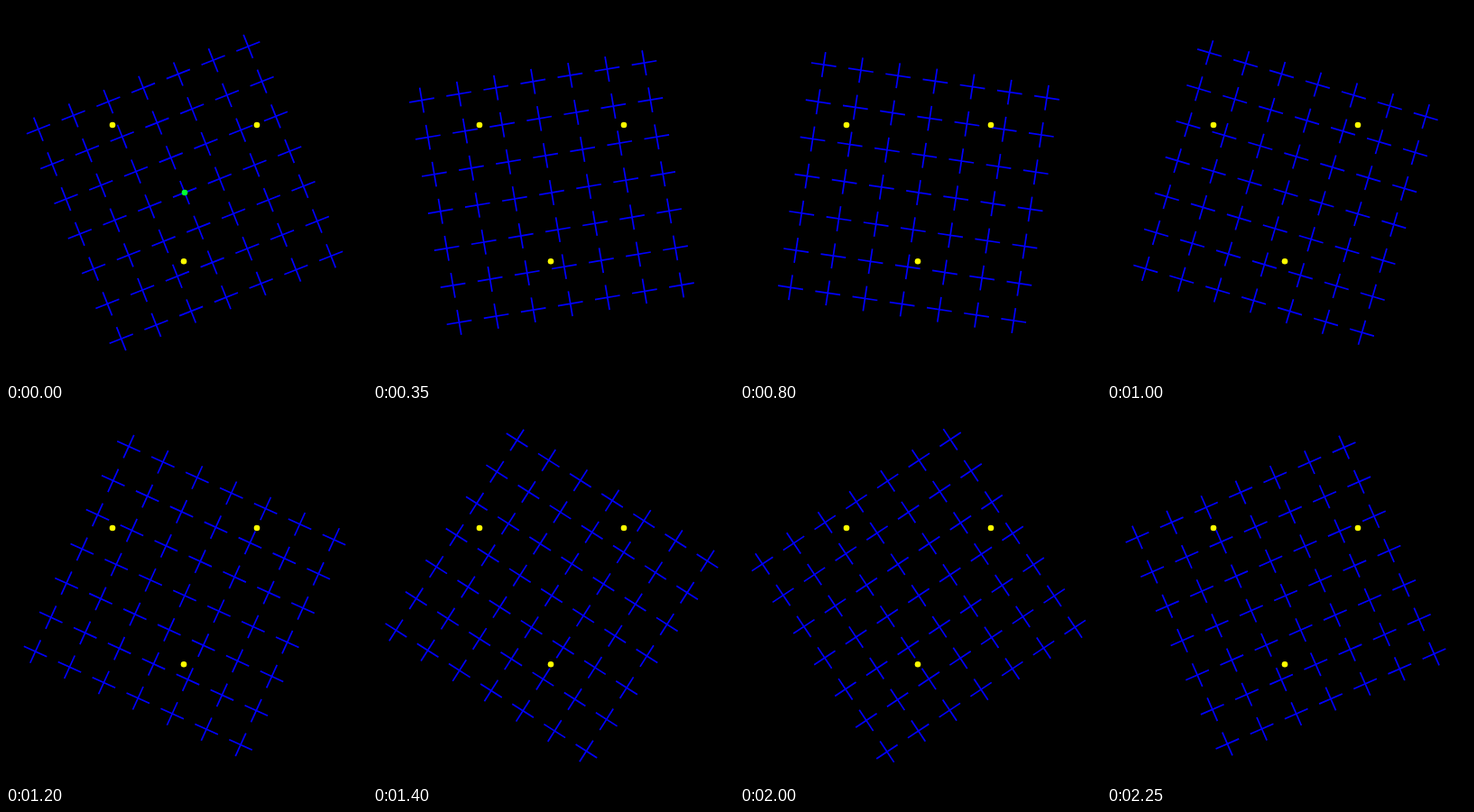
Write an HTML page with a canvas that moves like this. It is 400 px wide and 416 px high and loops after 2300 ms.

```html
<!DOCTYPE html>
<html lang="en">
<head>
<meta charset="utf-8">
<title>Rotating grid</title>
<style>
html, body { margin: 0; width: 100%; height: 100%; overflow: hidden; background: #000; }
canvas { display: block; }
</style>
</head>
<body>
<canvas id="stage" width="400" height="416"></canvas>
<script>
const ctx = document.getElementById('stage').getContext('2d');
const LOOP = 2300, STEP = 50;
const CX = 198, CY = 207, GAP = 41.65, ARM = 14;

// A 7 by 7 grid of crosses around the origin
const grid = new Path2D();
for (let i = -3; i <= 3; i++) {
  for (let j = -3; j <= 3; j++) {
    const x = i * GAP, y = j * GAP;
    grid.moveTo(x - ARM, y);
    grid.lineTo(x + ARM, y);
    grid.moveTo(x, y - ARM);
    grid.lineTo(x, y + ARM);
  }
}

function dot(x, y, color) {
  ctx.fillStyle = color;
  ctx.beginPath();
  ctx.arc(x, y, 3.3, 0, 2 * Math.PI);
  ctx.fill();
}

function draw() {
  const t = performance.now() % LOOP;
  // The first pose is held for two steps
  const pose = Math.max(0, Math.floor(t / STEP) - 1);

  ctx.fillStyle = '#000';
  ctx.fillRect(0, 0, 400, 416);

  ctx.save();
  ctx.translate(CX, CY);
  ctx.rotate((2 * pose - 21.55) * Math.PI / 180);
  ctx.strokeStyle = '#00f';
  ctx.lineWidth = 1.7;
  ctx.stroke(grid);
  ctx.restore();

  dot(118, 132, '#ff0');
  dot(278, 132, '#ff0');
  dot(197, 283.3, '#ff0');
  if (pose === 0) dot(CX, CY, '#0f3');

  requestAnimationFrame(draw);
}
draw();
</script>
</body>
</html>
```
